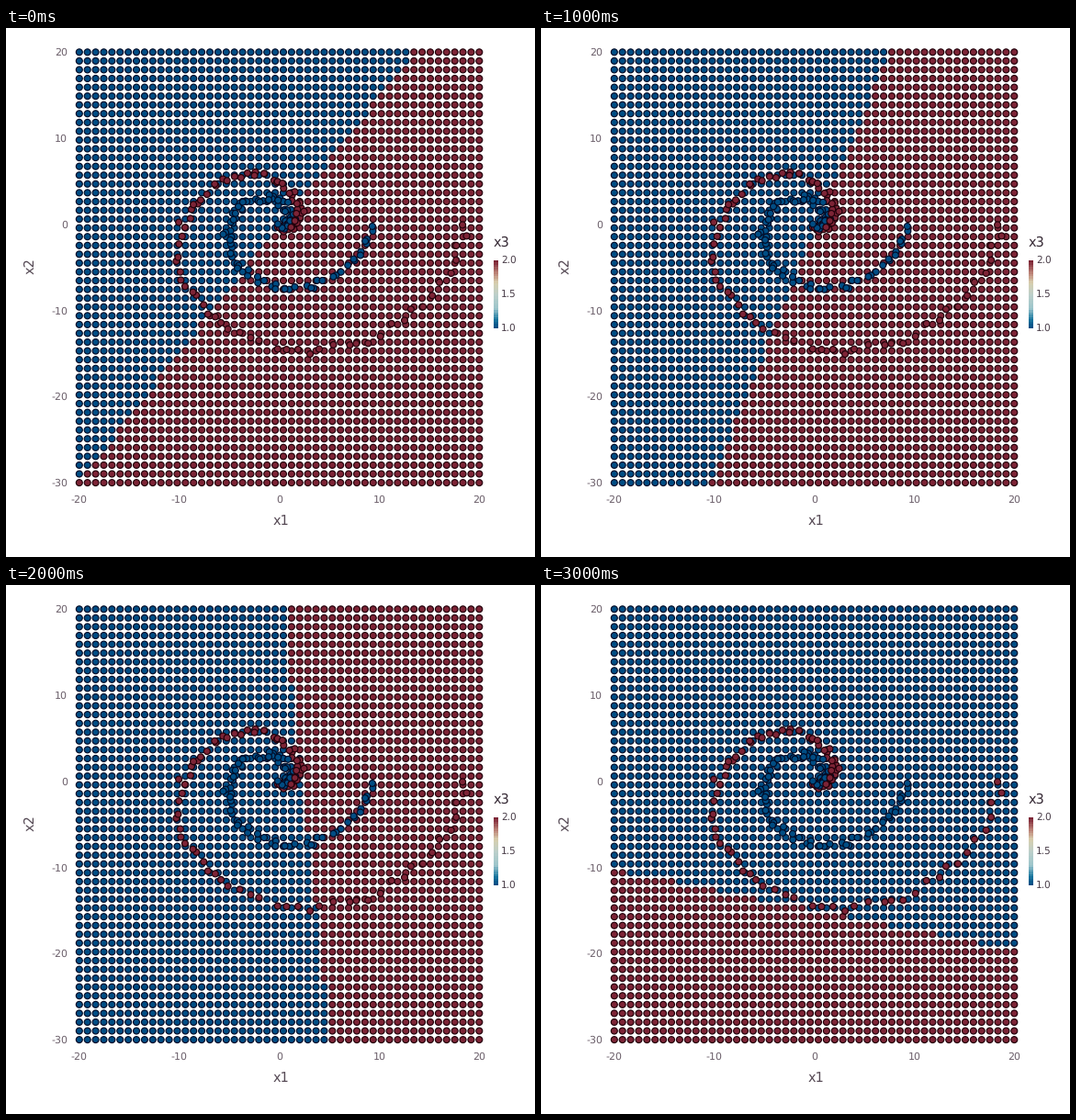
Write a matplotlib script that moves like this. It is 576 px wide and 576 px high and loops after 5.75 s.

```python
import numpy as np
import matplotlib.pyplot as plt
from matplotlib.animation import FuncAnimation
from matplotlib.colors import LinearSegmentedColormap, to_rgba

SIZE, N = 576, 50
LEFT, RIGHT, TOP, BOTTOM = 79.8, 515.3, 26.3, 495.1
BLUE, RED = "#004d84", "#7d2436"
BLUE_EDGE, RED_EDGE = "#000c28", "#22000a"
TICK, LABEL, TITLE, KEY = "#6c606b", "#564a55", "#362a35", "#4c404b"

plt.rcParams.update({"font.family": "DejaVu Sans", "text.hinting": "none"})
fig = plt.figure(figsize=(8, 8), dpi=72, facecolor="white")
ax = fig.add_axes([0, 0, 1, 1])
ax.axis("off")
rng = np.random.default_rng(8)


def px(x1):
    return LEFT + (x1 + 20) / 40 * (RIGHT - LEFT)


def py(x2):
    return TOP + (20 - x2) / 50 * (BOTTOM - TOP)


def dots(x1, x2, fill, edge):
    return ax.scatter(px(x1), py(x2), s=6.9 ** 2, c=fill, edgecolors=edge,
                      linewidths=1.2, snap=False)


def spiral(radii, count, noise):
    """Noisy clockwise spiral; radii are given every 60 degrees."""
    turn = np.linspace(0, 60 * (len(radii) - 1), count)
    r = np.interp(turn / 60, np.arange(len(radii)), radii)
    a = -np.radians(turn)
    jitter = rng.uniform(-noise, noise, (2, count))
    return np.array([r * np.cos(a), r * np.sin(a)]) + jitter


def text(x, y, s, size, color, ha="center"):
    ax.text(x, y, s, fontsize=size, color=color, ha=ha, va="center_baseline")


# Grid of classified points, then the training data on top
cols, rows = (g.ravel() for g in np.meshgrid(np.arange(N), np.arange(N)))
grid = dots(-20 + 40 * cols / (N - 1), 20 - 50 * rows / (N - 1),
            BLUE, BLUE_EDGE)

red = spiral([18.5, 16, 12.6, 9.6, 6.5, 3.4, 1.4, 0.3], 92, 0.5)
blue = spiral([9, 8, 6.5, 5, 3.6, 1.8, 0.9, 0.4], 102, 0.5)
order = rng.permutation(red.shape[1] + blue.shape[1])
is_red = order < red.shape[1]
dots(*np.hstack([red, blue])[:, order], np.where(is_red, RED, BLUE),
     np.where(is_red, RED_EDGE, BLUE_EDGE))

# Axes
for v in range(-30, 21, 10):
    text(67, py(v) - 0.4, str(v), 11, TICK, "right")
for v in range(-20, 21, 10):
    text(px(v), 512.5, str(v), 11, TICK)
text(299, 535, "x1", 14.5, LABEL)
ax.text(26.5, 259.5, "x2", fontsize=14.5, color=LABEL, rotation=90,
        ha="center", va="center")

# Colour key
text(531, 232, "x3", 14.5, TITLE, "left")
ramp = LinearSegmentedColormap.from_list(
    "key", [(0, BLUE), (0.12, "#1a78a0"), (0.28, "#9cc5cc"), (0.5, "#bdd0ca"),
            (0.68, "#d8cfae"), (0.82, "#bd8478"), (1, RED)])
ax.imshow(np.linspace(1, 0, 30)[:, None], cmap=ramp, aspect="auto",
          extent=(531, 536, 327, 253), interpolation="nearest")
for v in (1.0, 1.5, 2.0):
    text(539, 325.5 - 73.5 * (v - 1), f"{v:.1f}", 10.5, KEY, "left")
ax.set_xlim(0, SIZE)
ax.set_ylim(SIZE, 0)

# The steep line swings smoothly: grid column where it meets top and bottom row
SWING = 10
keys = [0, 2, 4, 6, 9]
top_path = np.polyfit(keys, [40.9, 37.87, 33.7, 28.56, 25.35], 4)
bottom_path = np.polyfit(keys, [-0.05, 4.75, 11.8, 21.01, 35.05], 4)
# Then it falls flat and settles: first row, column there, columns per row
SETTLE = [(34, 6.8, 8.35), (30, 1.65, 5.3), (30, 1.95, 5.3)]

FILLS = np.array([to_rgba(BLUE), to_rgba(RED)])
EDGES = np.array([to_rgba(BLUE_EDGE), to_rgba(RED_EDGE)])


def red_side(step):
    if step < SWING:
        top, bottom = np.polyval(top_path, step), np.polyval(bottom_path, step)
        return cols > top + (bottom - top) * rows / (N - 1)
    row, col, gain = SETTLE[min(step - SWING, len(SETTLE) - 1)]
    return cols <= col + gain * (rows - row)


def update(i):
    side = red_side(i).astype(int)
    grid.set_facecolors(FILLS[side])
    grid.set_edgecolors(EDGES[side])
    return [grid]


anim = FuncAnimation(fig, update, frames=23, interval=250, repeat=True,
                     repeat_delay=0, blit=False)
plt.show()
```
